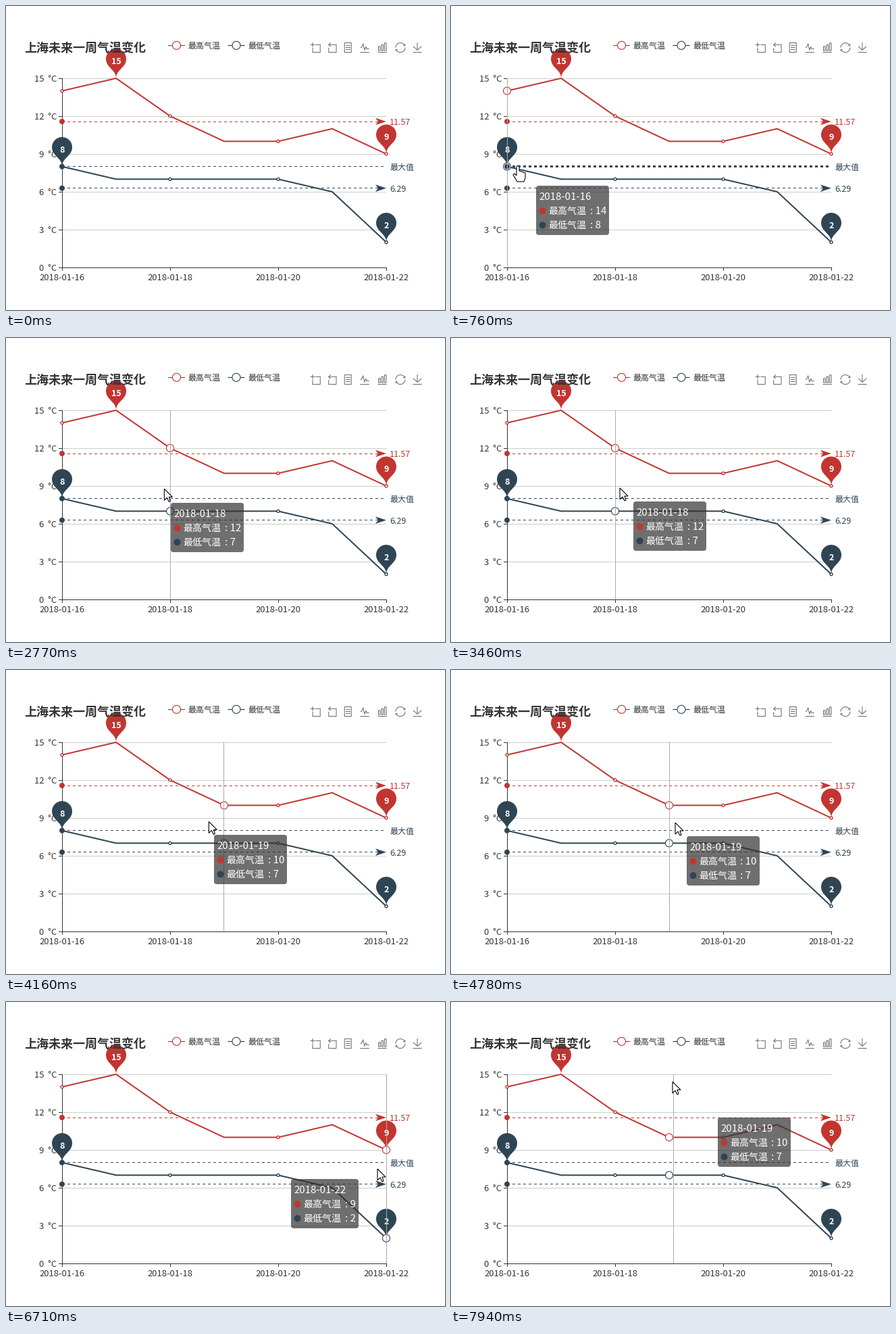
A matplotlib script for the animation above (8000 ms loop, 650 px wide and 450 px high).

```python
import numpy as np
import matplotlib.pyplot as plt
from matplotlib.animation import FuncAnimation
from matplotlib.patches import Circle, FancyBboxPatch, PathPatch, Polygon
from matplotlib.path import Path

plt.rcParams["lines.scale_dashes"] = False
plt.rcParams["path.snap"] = False

W, H, DPI = 650, 450, 100
PT = 72 / DPI  # points per pixel
INTERVAL, FRAMES = 40, 200
RATE = 13  # pose updates per second
STEPS = RATE * INTERVAL * FRAMES // 1000

RED, NAVY, INK = "#c23531", "#2f4554", "#333333"
NAMES = ("最高气温", "最低气温")
HIGH = [14, 15, 12, 10, 10, 11, 9]
LOW = [8, 7, 7, 7, 7, 6, 2]
LEFT, RIGHT, TOP, BOTTOM = 83, 563, 107, 387

fig = plt.figure(figsize=(W / DPI, H / DPI), dpi=DPI, facecolor="white")
ax = fig.add_axes([0, 0, 1, 1])
ax.set_xlim(0, W)
ax.set_ylim(H, 0)
ax.axis("off")


def px(i):
    return LEFT + 80 * i


def py(v):
    return BOTTOM - v * (BOTTOM - TOP) / 15


def crisp(v):
    """Centre of the pixel that holds v."""
    return np.floor(v + 0.1) + 0.5


def line(xs, ys, color, lw=1, z=1, **kw):
    return ax.plot(xs, ys, color=color, lw=lw * PT, zorder=z,
                   solid_capstyle="butt", dash_capstyle="butt", **kw)[0]


def text(x, y, s, size, color=INK, z=2, **kw):
    return ax.text(x, y, s, fontsize=size * PT, color=color, zorder=z,
                   family="Noto Sans CJK JP", va="baseline", **kw)


def circle(x, y, r, fill, edge="none", lw=0, z=3):
    return ax.add_patch(Circle((x, y), r, fc=fill, ec=edge, lw=lw * PT, zorder=z))


def date(i):
    return f"2018-01-{16 + i}"


def draw_axes():
    for v in range(0, 16, 3):
        y = crisp(py(v))
        if v:
            line([LEFT, RIGHT], [y, y], "#cccccc")
        line([LEFT - 5, LEFT], [y, y], INK)
        text(75, y + 4.5, f"{v}  °C", 13, ha="right")
    line([LEFT, RIGHT + 1], [crisp(BOTTOM)] * 2, INK, z=1.5)
    line([crisp(LEFT)] * 2, [TOP, BOTTOM], INK, z=1.5)
    for i in range(0, 7, 2):
        line([crisp(px(i))] * 2, [BOTTOM, BOTTOM + 5], INK)
        text(px(i), 406.5, date(i), 13, ha="center")


def draw_series(data, color):
    line([px(i) for i in range(7)], [py(v) for v in data], color, 2, 3,
         solid_joinstyle="bevel")
    for i in range(0, 7, 2):
        circle(px(i), py(data[i]), 2, "white", color, 1.4, 3.5)


def draw_pin(i, v, color):
    x, y, r, h = px(i), py(v), 15, 50
    dy = r * r / (h - r)
    cy = y - h + r + dy
    a = np.arcsin(dy / r)
    dx = np.cos(a) * r
    arc = np.linspace(np.pi - a, 2 * np.pi + a, 40)
    pts = [(x + r * np.cos(t), cy + r * np.sin(t)) for t in arc]
    cx, ky = dx - np.sin(a) * r * 0.6, cy + dy + np.cos(a) * r * 0.6
    pts += [(x + cx, ky), (x, y - r * 0.7), (x, y),
            (x, y - r * 0.7), (x - cx, ky), (x - dx, cy + dy)]
    codes = [Path.MOVETO] + [Path.LINETO] * 39 + [Path.CURVE4] * 6
    ax.add_patch(PathPatch(Path(pts, codes), fc=color, ec="none", zorder=5))
    text(x, y - 20.7, str(v), 12.5, "white", 5.5, ha="center", weight="bold")


def draw_mark(v, color, label, size, arrow=True):
    y = py(v)
    circle(LEFT, y, 4, color, z=6.6)
    if arrow:
        ax.add_patch(Polygon([(RIGHT, y), (547, y + 5.3), (551, y), (547, y - 5.3)],
                             fc=color, ec="none", zorder=4.5))
    text(568, y + 5, label, size, color, 4)
    return line([LEFT, RIGHT], [crisp(y)] * 2, color, 1, 4,
                linestyle=(0, (4 * PT, 4 * PT)))


def draw_legend(x, name, color):
    line([x, x + 25], [58.5, 58.5], color, 1.2, 2)
    circle(x + 12.5, 58.3, 6, "white", color, 1.1, 2.5)
    text(x + 29.5, 63.3, name, 12)


def rect(x0, y0, x1, y1):
    return [(x0, y0), (x1, y0), (x1, y1), (x0, y1), (x0, y0)]


def open_box(x0, y0, x1, y1):
    """Frame with a gap at its top left corner."""
    return [(x0 + 18, y0), (x1, y0), (x1, y1), (x0, y1), (x0, y0 + 18)]


def half_ring():
    t = np.linspace(np.pi, 1.88 * np.pi, 24)
    return np.column_stack([30 + 28 * np.cos(t), 30 + 28 * np.sin(t)])


def draw_toolbox():
    base = [(3, 58), (56, 58)]
    hook = np.array([(47, 19), (57, 19), (57, 9)])
    turn = [half_ring(), hook]
    icons = {
        458: [[(0, 13), (27, 13)], [(13, 0), (13, 27)], open_box(13, 13, 58, 58)],
        482.5: [[(22, 1), (10, 13), (22, 25)], [(10, 13), (28, 13)],
                open_box(10, 13, 55, 58)],
        505.7: [rect(11, 2, 51, 58)] + [[(18, y), (45, y)] for y in (17, 30, 42)],
        531: [[(4, 29), (11, 29), (20, 7), (28, 45), (37, 25), (41, 38), (56, 38)], base],
        557: [rect(7 + 18 * k, 23 - 10 * k, 17 + 18 * k, 48) for k in range(3)] + [base],
        583.7: turn + [60 - p for p in turn],
        609: [[(5, 23), (29, 45), (54, 23)], [(29, 45), (29, 0)], base],
    }
    for cx, strokes in icons.items():
        for pts in strokes:
            p = (np.array(pts) - 29) * 0.25 + (cx, 61.3)
            line(p[:, 0], p[:, 1], "#666666", 1, 2)


draw_axes()
draw_series(HIGH, RED)
draw_series(LOW, NAVY)
levels = [np.mean(HIGH), max(LOW), np.mean(LOW)]
marks = [draw_mark(levels[0], RED, f"{levels[0]:.2f}", 12.5),
         draw_mark(levels[1], NAVY, "最大值", 12, arrow=False),
         draw_mark(levels[2], NAVY, f"{levels[2]:.2f}", 12.5)]
for data, color in ((HIGH, RED), (LOW, NAVY)):
    for v in (max(data), min(data)):
        draw_pin(data.index(v), v, color)
text(27.5, 67.8, "上海未来一周气温变化", 18, z=6, weight="bold")
draw_legend(240, NAMES[0], RED)
draw_legend(328.5, NAMES[1], NAVY)
draw_toolbox()

# Moving parts
pointer = line([LEFT, LEFT], [TOP, BOTTOM], "#aaaaaa", 1, 7)
rings = [circle(0, 0, 5.5, "white", c, 1.1, 6.5) for c in (RED, NAVY)]
box = ax.add_patch(FancyBboxPatch((0, 0), 108, 73, boxstyle="round,pad=0,rounding_size=4",
                                  fc=(0.196, 0.196, 0.196, 0.7), ec="none", zorder=8))
head = text(0, 0, "", 15, "white", 8.5)
dots = [circle(0, 0, 5, c, z=8.5) for c in (RED, NAVY)]
labels = [text(0, 0, n, 14, "white", 8.5) for n in NAMES]
values = [text(0, 0, "", 15, "white", 8.5) for _ in NAMES]
hover_parts = [pointer, box, head, *rings, *dots, *labels, *values]

ARROW = np.array([(0, 0), (0, 17), (4, 13), (7, 19), (9, 18), (7, 12), (12, 12)])
HAND = np.array([(-4, 2), (-2, 0), (0, 2), (0, 8), (9, 11), (9, 18), (7, 24),
                 (-3, 24), (-9, 14), (-7, 12), (-4, 15)])
cursor = ax.add_patch(Polygon(ARROW, fc="white", ec="black", lw=1.1 * PT, zorder=9))

# Cursor moves: first step, last step, x and y reached
ENTRY = (150, 404)
MOVES = [
    (4, 5, 148, 330), (5, 9, 101, 236), (20, 27, 160, 230), (27, 41, 250, 222),
    (48, 62, 332, 226), (62, 70, 402, 226), (70, 80, 478, 233), (83, 84, 533, 238),
    (84, 86, 538, 243), (86, 87, 550, 247), (99, 103, 328, 118),
]


def cursor_at(step):
    pos = np.array(ENTRY, float)
    for start, end, x, y in MOVES:
        u = np.clip((step - start) / (end - start), 0, 1)
        pos += (np.array([x, y]) - pos) * (1 - (1 - u) ** 1.7)
    return pos


def build_poses():
    """Tooltip and pointer trail the cursor by one step and ease after it."""
    poses, tip, bar_x = [], None, None
    for s in range(STEPS):
        x, y = cursor_at(s - 1)
        if s < MOVES[0][0]:
            poses.append(None)
            continue
        if y > BOTTOM:
            poses.append((cursor_at(s), None))
            continue
        i = int(np.clip(round((x - LEFT) / 80), 0, 6))
        width = 108 if HIGH[i] > 9 else 100
        tx = x + 20 if x + 20 + width < W else x - 20 - width
        goal = np.array([tx, y + 20])
        tip = goal if tip is None else tip + (goal - tip) * 0.6
        bar_x = px(i) if bar_x is None else bar_x + (px(i) - bar_x) * 0.93
        poses.append((cursor_at(s), tip, i, width, bar_x))
    return poses


POSES = build_poses()


def show_tip(tip, i, width, bar_x):
    x, y = np.round(tip)
    pointer.set_xdata([crisp(bar_x)] * 2)
    box.set_bounds(x, y, width, 73)
    head.set_text(date(i))
    head.set_position((x + 4.5, y + 21))
    for k, data in enumerate((HIGH, LOW)):
        mid = y + 37.3 + 21 * k
        rings[k].center = (px(i), py(data[i]))
        dots[k].center = (x + 9.5, mid)
        labels[k].set_position((x + 18, mid + 5))
        values[k].set_position((x + 79.5, mid + 5))
        values[k].set_text(f": {data[i]}")


def show_cursor(pos):
    over = [abs(pos[1] - py(v)) <= 3 for v in levels]
    for m, on in zip(marks, over):
        m.set_linewidth((3 if on else 1) * PT)
    cursor.set_xy((HAND if any(over) else ARROW) + pos)


def update(n):
    step = int((n + 0.5) * INTERVAL * RATE / 1000)
    pose = POSES[step]
    inside = pose is not None and pose[1] is not None
    for part in hover_parts:
        part.set_visible(inside)
    cursor.set_visible(pose is not None)
    show_cursor(pose[0] if pose else np.array(ENTRY))
    if inside:
        show_tip(*pose[1:])
    return [*hover_parts, *marks, cursor]


anim = FuncAnimation(fig, update, frames=FRAMES, interval=INTERVAL,
                     repeat=True, repeat_delay=0, blit=False)
plt.show()
```
